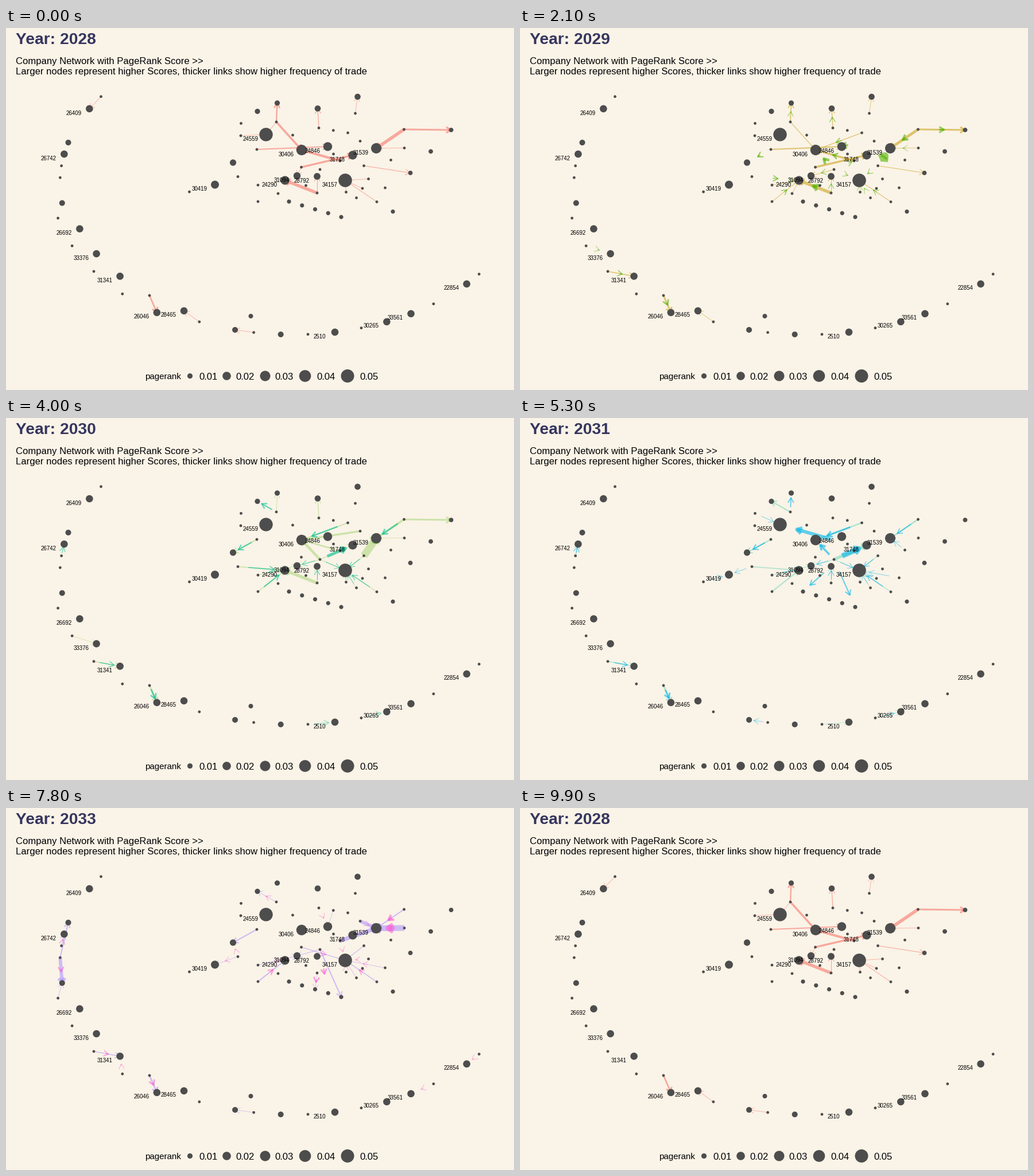
A matplotlib script that plays this animation: 885x632 px, repeating every 10000 ms.

```python
from math import cos, sin, radians, hypot

import numpy as np
import matplotlib.pyplot as plt
from matplotlib.animation import FuncAnimation
from matplotlib.collections import LineCollection

W, H, DPI = 885, 632, 100
PT = 72 / DPI
BG, NODE, TITLE = "#FAF3E7", "#4D4D4D", "#36365F"
ALPHA, HEAD = 0.6, 10
SELLER, RING_BUYER = 2.4, 6.3

YEARS = range(2028, 2035)
COLORS = ["#F8766D", "#C49A00", "#53B400", "#00C094",
          "#00B6EB", "#A58AFF", "#FB61D7"]
STARTS = [6, 21, 36, 50, 64, 78, 92]
STEPS = [9, 9, 9, 8, 8, 8, 8]

plt.rcParams["font.family"] = "Liberation Sans"

nodes, labels = {}, {}


def row(first, n, x0, y0, x1, y1, r=SELLER):
    """Spread n nodes evenly along a line, numbered from first."""
    for i, (x, y) in enumerate(np.linspace((x0, y0), (x1, y1), n)):
        nodes[first + i] = x, y, r


# Outer companies 0..28 sit on an ellipse, in evenly spaced groups
group_ends = [0, 1, 2, 9, 10, 11, 22, 23, 26, 27, 28]
group_angles = [37, 41.8, 52.9, 99.7, 104.4, 113.7, 172.3, 181.9,
                195.3, 209.1, 214.5]
ring_labels = {1: 22854, 3: 33561, 4: 30265, 6: 2510, 12: 28465, 13: 26046,
               16: 31341, 18: 33376, 20: 26692, 25: 26742, 27: 26409}
for i in range(29):
    t = radians(np.interp(i, group_ends, group_angles))
    zigzag = -0.035 * (-1) ** i if 11 < i < 22 else 0
    k = 0.99 + zigzag
    r = RING_BUYER if i in ring_labels else 5 if i in (8, 10, 22, 26) else SELLER
    nodes[i] = 500 + 410 * k * cos(t), 270 + 268 * k * sin(t), r
labels.update(ring_labels)

# Sellers of the inner cluster
row(30, 2, 409.5, 166.5, 409, 188)
row(32, 1, 437, 212, 437, 212)
row(33, 2, 471, 164, 499.5, 187)
row(35, 3, 545, 174.5, 595.5, 183)
row(38, 2, 608.5, 149, 617, 197.5)
row(40, 2, 570.5, 220, 582, 232)
row(42, 2, 514.5, 243, 547, 247)
row(44, 3, 404, 259.5, 474, 289)
row(47, 2, 439, 303, 542, 288)
row(49, 1, 592.5, 286.5, 592.5, 286.5)
row(50, 3, 631.5, 263.5, 610.5, 296.5)
row(53, 2, 660.5, 279, 646, 303.5)
row(55, 2, 623.5, 240.5, 670.5, 230.5)
row(57, 2, 694, 209.5, 693.5, 177)
row(59, 2, 319.5, 286, 522.5, 275)

# Buyers around its rim
row(61, 2, 438, 145.5, 472.5, 131, 4.6)
row(63, 2, 543, 140.5, 612.5, 120, 5.3)
row(65, 3, 775.5, 178, 704.5, 253, 3.9)
row(68, 5, 493, 303, 584, 330, 3.6)
row(73, 1, 674, 320.5, 674, 320.5, 3.6)
row(74, 1, 395.5, 235, 395.5, 235, 5.6)
row(75, 1, 426.5, 503, 426.5, 503, 4)

hubs = {
    24559: (453, 186, 11.7), 30406: (515, 213, 9.2), 24846: (560.5, 207, 7.7),
    31748: (604, 222, 7.6), 31539: (645, 210, 9), 34157: (591, 266, 11.8),
    31094: (507, 258, 6.2), 24290: (486, 266, 7.6), 28792: (542, 259, 5.9),
    30419: (364, 273.5, 7),
}
nodes.update(hubs)
labels.update((name, name) for name in hubs)

links = [[] for _ in YEARS]


def trade(seller, buyer, first, last, w0, w1=None):
    """A link kept from first to last, its width going from w0 to w1."""
    widths = np.linspace(w0, w0 if w1 is None else w1, last - first + 1)
    for state, w in enumerate(widths, first):
        links[state].append((seller, buyer, w))


def best_buyer(seller):
    """Buyers attract by score over distance."""
    x, y, _ = nodes[seller]
    buyers = [n for n in nodes if nodes[n][2] > SELLER]
    return max(buyers, key=lambda n: nodes[n][2]
               / hypot(nodes[n][0] - x, nodes[n][1] - y))


# Outer trade
trade(14, 13, 0, 6, 2.7)
trade(17, 16, 1, 6, 1.5)
trade(19, 18, 2, 2, .8)
trade(24, 25, 3, 6, 1.2)
trade(23, 22, 5, 6, 6, 2)
trade(23, 26, 5, 5, 2)

# Into 31539 and along the right side
trade(58, 31539, 0, 4, 5.6, 1.6)
trade(58, 31539, 5, 6, 2, 4)
trade(57, 31539, 5, 6, 10)
trade(55, 31539, 2, 2, 13)
trade(39, 31539, 5, 5, 6)
trade(41, 31539, 5, 5, 7)
trade(58, 65, 0, 2, 3)
trade(55, 67, 0, 1, 1.1)

# Into 30406, 24846 and 31748
trade(33, 30406, 0, 1, 3.6, 1.2)
trade(41, 30406, 0, 2, 4.2, 2.6)
trade(39, 30406, 2, 2, 3.4)
trade(37, 30406, 1, 4, 1.3, 3)
trade(43, 30406, 2, 2, 4.5)
trade(43, 30406, 4, 4, 3.6)
trade(32, 24846, 0, 1, 2)
trade(42, 31748, 0, 1, 3.4)
trade(43, 31748, 2, 4, 1.4, 9)
trade(40, 24559, 4, 4, 6)

# Into the hubs below
trade(48, 24290, 0, 2, 5.4)
trade(47, 24290, 1, 3, 1, 2.1)
trade(47, 24290, 5, 6, 2)
trade(44, 24290, 2, 3, 1.7)
trade(43, 31094, 1, 5, 1.1)
trade(45, 31094, 2, 6, 1.1)
trade(48, 28792, 0, 4, 1.2)
trade(54, 34157, 0, 6, 1, 1.6)
trade(55, 34157, 2, 5, 1.2)
trade(43, 34157, 2, 4, 1)
trade(42, 34157, 5, 6, 1.3)
trade(44, 30419, 4, 6, .8)

# Out to the rim
trade(33, 62, 0, 2, 2.4, 1)
trade(35, 63, 0, 2, 1.3)
trade(32, 74, 2, 5, 2.1)
trade(33, 61, 3, 3, 2.2)
trade(33, 61, 5, 6, .9)
trade(33, 62, 4, 4, 1.8)
trade(43, 72, 4, 5, 2)
trade(28792, 68, 4, 4, 2)
trade(48, 70, 5, 6, .8, 2.6)
trade(43, 71, 6, 6, 2.6)

# Sellers making one small trade with their best buyer, year by year
small_trades = [
    [9, 11, 28, 31, 33, 38, 42, 49, 50, 51, 57],
    [11, 38, 45, 46, 49, 57],
    [49, 52, 57],
    [5, 7, 49, 52],
    [5, 9, 30, 51, 52, 53, 56, 59],
    [9, 21, 36, 52, 53],
    [0, 2, 15, 35, 39, 41, 44, 49, 50, 53],
]
for state, sellers in enumerate(small_trades):
    for s in sellers:
        trade(s, best_buyer(s), state, state, .8)

fig = plt.figure(figsize=(W / DPI, H / DPI), dpi=DPI, facecolor=BG)
ax = fig.add_axes([0, 0, 1, 1])
ax.set(xlim=(0, W), ylim=(H, 0))
ax.axis("off")


def text(x, y, s, size, **kw):
    return ax.text(x, y, s, fontsize=size, va="baseline", zorder=4, **kw)


def dots(items):
    x, y, r = np.array(items).T
    ax.scatter(x, y, s=(2 * r * PT) ** 2, c=NODE, linewidths=0, zorder=3)


def arrow_layer(z):
    return ax.add_collection(LineCollection(
        [], capstyle="butt", joinstyle="round", zorder=z), autolim=False)


def draw_arrows(layer, state, grow, alpha):
    """Arrows scaled about their midpoints; the heads keep their size."""
    paths, widths = [], []
    for seller, buyer, w in links[state]:
        a, b = np.array(nodes[seller][:2]), np.array(nodes[buyer][:2])
        mid, half = (a + b) / 2, (b - a) / 2 * grow
        tip = mid + half
        back = np.arctan2(*(a - b)[::-1])
        left, right = (tip + HEAD * np.array([cos(t), sin(t)])
                       for t in (back - np.pi / 6, back + np.pi / 6))
        paths += [[mid - half, tip], [left, tip, right]]
        widths += [w * PT] * 2
    layer.set(segments=paths, linewidth=widths,
              color=COLORS[state], alpha=alpha)


heading = text(17, 27.5, "", 20.3, color=TITLE, weight="bold")
text(17, 63, "Company Network with PageRank Score >>", 11.95)
text(17, 81, "Larger nodes represent higher Scores, "
     "thicker links show higher frequency of trade", 11.95)

dots(list(nodes.values()))
for n, name in labels.items():
    text(nodes[n][0] - 26.8, nodes[n][1] + 10.6, str(name), 7, ha="center")

text(242.5, 613, "pagerank", 10.9)
legend = [(320.5, 4.6, 336.5), (384.5, 7.3, 400.5), (451.5, 9, 468.5),
          (521, 10.3, 541), (595, 11.5, 616)]
dots([(x, 607.5, r) for x, r, _ in legend])
for i, (_, _, x) in enumerate(legend, 1):
    text(x, 613.5, f"0.0{i}", 11.95)

leaving, entering = arrow_layer(1), arrow_layer(2)


def update(k):
    i = sum(k >= s for s in STARTS) - 1
    step = min(k - STARTS[i] + 1, STEPS[i]) if i >= 0 else STEPS[i]
    p = step / STEPS[i]
    old, new = i % len(YEARS), (i + 1) % len(YEARS)
    draw_arrows(leaving, old, 1, ALPHA * (1 - p))
    draw_arrows(entering, new, p, ALPHA)
    nearest = old if step <= (STEPS[i] + 1) // 2 else new
    heading.set_text(f"Year: {YEARS[nearest]}")
    return leaving, entering, heading


anim = FuncAnimation(fig, update, frames=100, interval=100,
                     repeat=True, repeat_delay=0)
plt.show()
```
